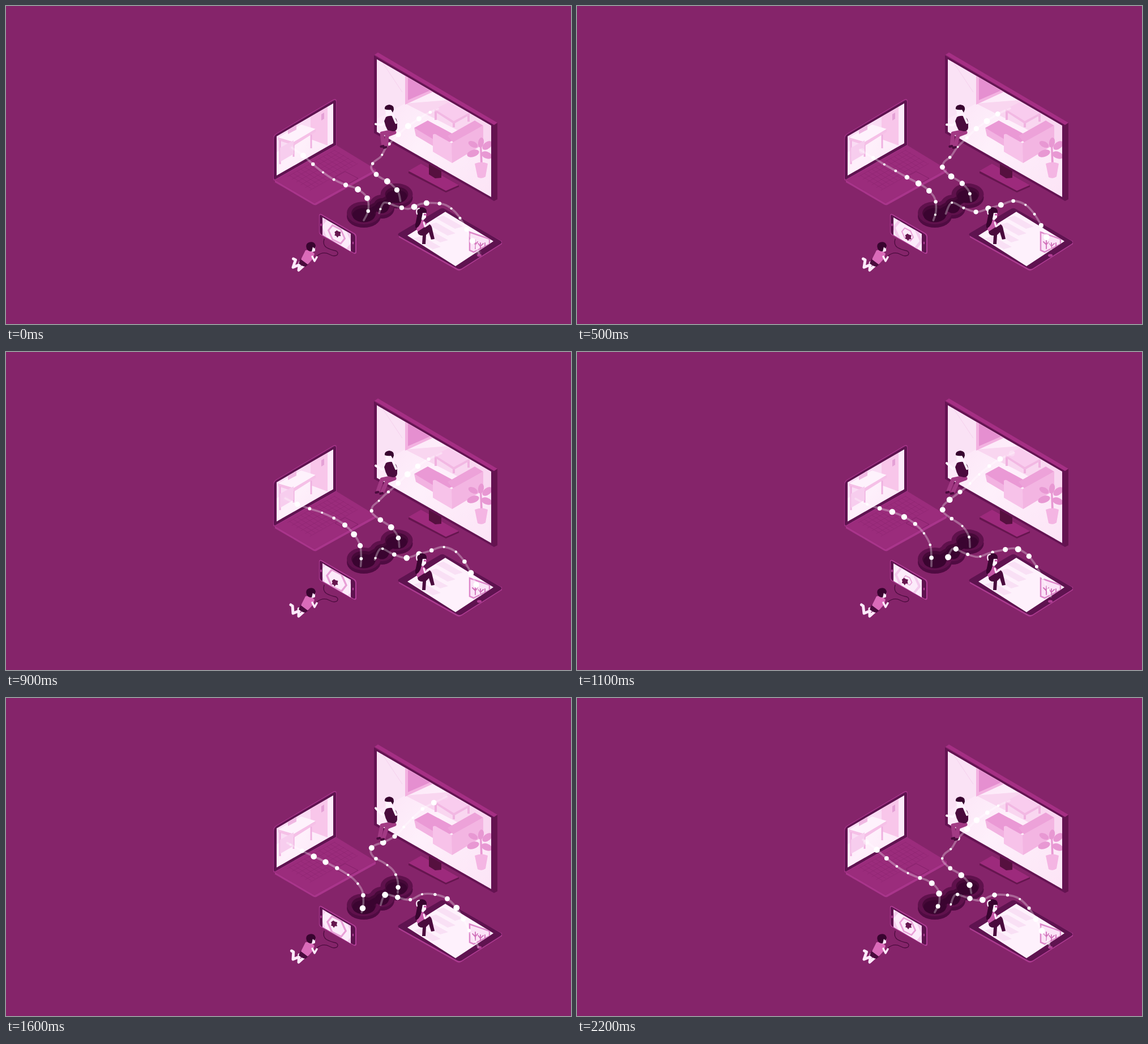
These frames come from a looping animation (998x561 px, 2.25 s). An HTML page:

```html
<!DOCTYPE html>
<html lang="en">
<head>
<meta charset="utf-8">
<title>Connected screens</title>
<style>
html, body { margin: 0; width: 100%; height: 100%; overflow: hidden; background: #85246a; }
svg { display: block; width: 100vw; height: 100vh; }
.round { stroke-linejoin: round; stroke-linecap: round; }
.line { fill: none; stroke-linecap: round; stroke-linejoin: round; }
</style>
</head>
<body>
<svg viewBox="0 0 998 561" preserveAspectRatio="none">
  <defs>
    <clipPath id="tvClip"><path d="M655 94L857 211V337L655 222Z"/></clipPath>
    <clipPath id="laptopClip"><path d="M478 230L578 172V242L478 299Z"/></clipPath>
    <clipPath id="tabletClip"><path d="M776 363L861 415L794 459L709 405Z"/></clipPath>
    <clipPath id="phoneClip"><path d="M559 373L609 402V433L559 404Z"/></clipPath>
    <linearGradient id="pale" x1="0" y1="0" x2="1" y2="1">
      <stop offset="0" stop-color="#fbe0f5"/><stop offset=".5" stop-color="#fef0fb"/><stop offset="1" stop-color="#fce4f6"/>
    </linearGradient>
  </defs>
  <rect width="998" height="561" fill="#85246a"/>

  <g id="tv">
    <path d="M711 292L733 278L800 316V319L777 329L711 295Z" fill="#66154f"/>
    <path d="M711 291L733 278L800 316L777 326Z" fill="#9d2a7c"/>
    <path d="M747 273L769 286V303L758 304L747 297Z" fill="#56103f"/>
    <path d="M651 86L657 82L868 206L862 210Z" fill="#a52f84" class="round"/>
    <path d="M862 210L868 206V341L862 344Z" fill="#65134f"/>
    <path d="M650 87L862 210V344L650 224Z" fill="#641352"/>
    <path d="M655 94L857 211V337L655 222Z" fill="url(#pale)"/>
    <g clip-path="url(#tvClip)">
      <path d="M655 94L705 123V172L655 199Z" fill="#fae2f5"/>
      <path d="M664 98L700 152M705 172L757 143" stroke="#f6d3ee" stroke-width="1.2"/>
      <path d="M705 172L780 166L857 211V250L770 205Z" fill="#f9d6f0"/>
      <path d="M705 122L755 151L705 174Z" fill="#f3b2e1"/>
      <path d="M710 126L749 149L710 166Z" fill="#e58fd0"/>
      <path d="M757 185V201H761V188L789 205V214H793V206L815 194V204H819V190Z" fill="#f0b2e0"/>
      <path d="M757 182L781 170L819 190L791 206Z" fill="#f9ccee"/>
      <path d="M757 182L791 203L819 188V192L791 208L757 186Z" fill="#f2b8e3"/>
      <path d="M721 215L745 202L801 232L768 247Z" fill="#ea99d5"/>
      <path d="M721 215L768 243V255L724 229Z" fill="#f2b2e1"/>
      <path d="M780 229L828 202L843 211L791 242Z" fill="#eda2d9"/>
      <path d="M754 227Q757 224 762 228L787 242L843 211V244L788 277L754 257Z" fill="#f7c2e9"/>
      <path d="M787 242L843 211V244L788 277Z" fill="#f3b5e2"/>
      <g fill="#e898d3">
        <ellipse cx="825" cy="244" rx="9" ry="5" transform="rotate(28 825 244)"/>
        <ellipse cx="839" cy="241" rx="5" ry="9" transform="rotate(10 839 241)"/>
        <ellipse cx="850" cy="246" rx="10" ry="6" transform="rotate(-38 850 246)"/>
        <ellipse cx="825" cy="260" rx="11" ry="6" transform="rotate(-18 825 260)"/>
        <ellipse cx="849" cy="263" rx="10" ry="6" transform="rotate(22 849 263)"/>
        <path d="M837 244H840L842 280H838Z"/>
      </g>
      <path d="M828 278Q840 273 851 278L847 301Q840 306 833 302Z" fill="#f4b5e3"/>
    </g>
  </g>

  <g id="laptop">
    <path d="M475 307L545 348L653 288V293L548 351Q545 352 542 350L475 311Z" fill="#a9358b"/>
    <path d="M475 307L584 246L653 288L545 348Z" fill="#9b2c7c"/>
    <path id="keys" stroke="#8f2672" stroke-width=".7" class="line"/>
    <path d="M581 302L599 292L622 304L604 314Z" fill="none" stroke="#84216a"/>
    <path d="M472 234Q472 228 477 225L578 165Q584 162 584 169V246L474 308Q472 308 472 303Z" fill="#a33286"/>
    <path d="M473 235Q473 229 478 226L578 167Q583 164 583 170V245L475 306Q473 306 473 302Z" fill="#5f1350"/>
    <path d="M478 230L578 172V242L478 299Z" fill="url(#pale)"/>
    <g clip-path="url(#laptopClip)">
      <path d="M538 190L568 172V246L538 235Z" fill="#f8c6ea"/>
      <path d="M568 172L578 166V246L568 243Z" fill="#fdeafa"/>
      <path d="M478 230L538 195V222L478 258Z" fill="#fadcf4"/>
      <path d="M557 191L562 188V199L557 202Z" fill="#e4a1d6"/>
      <path d="M481 232L521 209L547 217L508 240Z" fill="#fef2fc"/>
      <path d="M481 232L508 240L547 217V222L509 246L481 237Z" fill="#f5c0e7"/>
      <path d="M484 237V279M508 245V266M539 227V251" stroke="#efb0e0" stroke-width="3"/>
      <path d="M484 250L508 237V261L484 275Z" fill="#f7cdee"/>
      <path d="M498 226V216L513 208V218Z" fill="#f0b9e3"/>
    </g>
  </g>

  <g id="hole"></g>

  <g id="tablet">
    <path d="M694 405L773 360L876 415V420L805 465Q801 468 797 466L694 408Z" fill="#ac3b90" class="round"/>
    <path d="M695 400L765 359Q770 355 775 358L873 414Q878 417 873 420L805 463Q801 465 797 463L695 406Q690 403 695 400Z" fill="#5f1350"/>
    <path d="M776 363L861 415L794 459L709 405Z" fill="#fef1fc"/>
    <g clip-path="url(#tabletClip)">
      <path id="stairs" fill="#f9e0f5"/>
      <path d="M819 399L854 411V420L826 434L819 431Z" fill="#fbe3f7" stroke="#dd88ca" stroke-width="2.5"/>
      <path d="M829 428V413M829 421L824 416M829 421L833 416M838 428V418M838 424L834 419M838 424L843 419M846 425V418" stroke="#d06fb9" stroke-width="1.8" class="line"/>
    </g>
    <ellipse cx="836" cy="440" rx="4" ry="2.4" fill="#b03e94"/>
  </g>

  <g id="strings"></g>

  <g id="phone">
    <path d="M553 370Q553 366 557 367L616 401Q619 403 619 406V435Q618 438 615 437L556 404Q553 402 553 399Z" fill="#b13d96"/>
    <path d="M554 371Q554 367 557 369L614 402Q617 404 617 407V433Q617 436 614 435L557 403Q554 401 554 398Z" fill="#5f1350"/>
    <path d="M559 373L609 402V433L559 404Z" fill="#fcebfa"/>
    <g clip-path="url(#phoneClip)">
      <path id="ringBig" fill="none" stroke="#f4cbed"/>
      <path id="ring" fill="none" stroke="#e8a0d7"/>
      <path id="flower" d="M-5 -3L-1 -6L2 -4L6 -3L5 1L6 4L2 4L0 7L-2 4L-5 3L-4 0Z" fill="#66164f"/>
    </g>
    <ellipse cx="556.5" cy="386" rx="1.5" ry="2.5" fill="#b13d96"/>
    <ellipse cx="613" cy="418" rx="1.2" ry="2.5" fill="#b13d96"/>
  </g>

  <g id="boy">
    <path d="M562 411Q559 421 566 426Q573 430 583 432Q588 435 585 439Q580 443 571 438Q560 432 549 441" stroke="#4a0b3d" stroke-width="1.3" class="line"/>
    <path id="boyLegs" stroke="#fdeafa" stroke-width="5" class="line"/>
    <path d="M521 445L535 455L529 460Q522 459 517 454Z" fill="#4a0b3d"/>
    <path d="M529 431Q537 429 545 437L542 446L533 456L521 447Z" fill="#da6bb9"/>
    <path d="M541 442L545 450L549 443" stroke="#fdeafa" stroke-width="3.5" class="line"/>
    <path d="M537 425H546V432Q543 435 538 433Z" fill="#fdeafa"/>
    <path d="M531 428Q528 420 535 417Q545 414 547 423L545 428L542 425L540 433Q533 433 531 428Z" fill="#38042f"/>
  </g>

  <g id="man">
    <path id="manLegs" stroke="#a23a84" stroke-width="7" class="line"/>
    <path id="manShoes" stroke="#4a0b3d" stroke-width="4" class="line"/>
    <path id="manArm" stroke="#fff4fe" stroke-width="4" class="line"/>
    <path d="M671 196Q675 193 682 194Q691 197 691 207V215Q690 221 683 221L674 219Q670 212 668 203Z" fill="#4a0b3d"/>
    <path d="M670 181L683 182L682 191Q677 196 671 193Z" fill="#fff4fe"/>
    <path d="M689 206L683 192" stroke="#fff4fe" stroke-width="4" class="line"/>
    <path d="M669 182Q668 175 677 174Q686 175 685 183L683 188L680 183Q674 184 669 182Z" fill="#38042f"/>
  </g>

  <g id="girl">
    <path d="M727 399Q729 390 740 388L748 385Q752 387 753 394L757 411L751 412L747 399L742 404L741 420L735 420L736 405Q728 405 727 399Z" fill="#4a0b3d"/>
    <path d="M726 381L736 377L743 384L741 389L727 398Q724 393 726 381Z" fill="#c457a6"/>
    <path d="M738 382L740 389L746 385" stroke="#fdeafa" stroke-width="3" class="line"/>
    <path d="M732 364L742 363V373L737 378L732 376Z" fill="#fff4fe"/>
    <path d="M727 366Q725 355 735 355Q744 356 743 365L736 365L734 375Q733 387 725 392Q721 390 724 381Z" fill="#38042f"/>
    <path d="M726 367Q723 358 730 357" stroke="#fff4fe" stroke-width="2" class="line"/>
    <path d="M738 368H743" stroke="#c457a6" stroke-width="3"/>
  </g>
</svg>
<script>
const LOOP = 2250, STEP = 50, TAU = Math.PI * 2;
const byId = id => document.getElementById(id);
const make = (parent, name, attrs) => {
  const node = document.createElementNS('http://www.w3.org/2000/svg', name);
  for (const key in attrs) node.setAttribute(key, attrs[key]);
  return parent.appendChild(node);
};
const setD = (id, d) => byId(id).setAttribute('d', d);
const wave = (t, peak) => Math.cos(TAU * (t - peak) / LOOP);
const points = text => text.split(' ').map(p => p.split(',').map(Number));

// Even sway, and a sway that rises slowly and drops fast
const sway = peak => t => (1 + wave(t, peak)) / 2;
const lopsided = (start, rise) => t => {
  const u = (t - start + LOOP) % LOOP;
  return Math.pow(u < rise ? u / rise : (LOOP - u) / (LOOP - rise), 1.3);
};

// Smooth curve through all knots
function curve(p) {
  let d = 'M' + p[0];
  for (let i = 0; i < p.length - 1; i++) {
    const a = p[i - 1] || p[i], b = p[i], c = p[i + 1], e = p[i + 2] || c;
    const c1 = b.map((v, j) => v + (c[j] - a[j]) / 6);
    const c2 = c.map((v, j) => v - (e[j] - b[j]) / 6);
    d += `C${c1} ${c2} ${c}`;
  }
  return d;
}

// Joined rings: side, rim, inner wall, floor
const lobes = [[632, 365, 30, 20], [664, 351, 22, 18], [690, 332, 28.5, 19]];
for (const [dy, inset, fill] of [[6, 0, '#500b42'], [0, 0, '#5f114c'], [0, 8, '#460938'], [4, 10, '#3a0430']]) {
  const hole = byId('hole');
  for (const [cx, cy, rx, ry] of lobes)
    make(hole, 'ellipse', { cx, cy: cy + dy, rx: rx - inset, ry: ry - inset * .75, fill });
  make(hole, 'path', { d: `M636 ${363 + dy}L688 ${334 + dy}`, stroke: fill, 'stroke-width': 26 - inset * 1.5 });
}

let keys = '';
for (let i = 0; i < 6; i++) keys += `M${497 + i * 8} ${301 + i * 4.8}l84 -47`;
for (let i = 0; i < 13; i++) keys += `M${501 + i * 6.6} ${299 - i * 3.7}l38 23`;
setD('keys', keys);

let stairs = '';
for (let i = 0; i < 5; i++) stairs += `M${773 - i * 13} ${370 + i * 12}l34 19l-14 4l-34 -19Z`;
setD('stairs', stairs);

// first: offset of the leading bead, crest: position of the largest bead, both in bead gaps
const GAP = 23;
const strings = [
  { mix: sway(0), first: .785, crest: 2.55,
    from: '626,378 626,362 624,341 613,320 597,303 578,291 557,282 535,276 513,269 492,259',
    to: '632,378 640,360 637,337 619,322 598,315 577,305 558,292 540,277 524,263 505,250' },
  { mix: lopsided(100, 1500), first: .9, crest: 1.85,
    from: '697,344 692,327 676,312 657,301 645,287 650,276 663,266 672,249 689,230 705,215 723,203 742,191 762,182',
    to: '692,344 692,323 684,304 668,291 650,281 644,269 651,260 668,254 688,243 706,224 722,208 740,193 778,174' },
  { mix: sway(700), first: .33, crest: 3.6,
    from: '663,365 671,347 692,351 714,355 736,345 758,346 780,355 795,371 807,391 818,413 829,432 834,440',
    to: '650.5,366.5 661,347 683,357 705,364 727,358 749,351 770,343 792,349 808,365 820,385 830,407 838,428' }
].map(s => {
  const group = make(byId('strings'), 'g', {});
  return { ...s, from: points(s.from), to: points(s.to),
    path: make(group, 'path', { class: 'line', stroke: '#fff', 'stroke-width': 3.6, 'stroke-opacity': .3 }),
    beads: Array.from({ length: 15 }, () => make(group, 'circle', { fill: '#fff' })) };
});

function drawString(s, t) {
  const mix = s.mix(t);
  s.path.setAttribute('d', curve(s.from.map((p, i) => p.map((v, j) => v + (s.to[i][j] - v) * mix))));
  const total = s.path.getTotalLength();
  const offset = (s.first + 12 * t / LOOP) % 1;
  const crest = s.crest + 30 * t / LOOP;
  s.beads.forEach((bead, i) => {
    const place = offset + i, along = place * GAP;
    const { x, y } = s.path.getPointAtLength(Math.min(along, total));
    bead.setAttribute('cx', x);
    bead.setAttribute('cy', y);
    bead.setAttribute('r', 3.7 + 1.75 * Math.cos(TAU * (place - crest) / 6));
    bead.setAttribute('opacity', Math.max(0, Math.min(1, (total - along) / 15)));
  });
}

function drawRing(id, r) {
  let d = '';
  for (let i = 0; i < 6; i++) {
    const a = i * TAU / 6, x = r * Math.cos(a);
    d += `${i ? 'L' : 'M'}${584 + x} ${403 + x * .5 + r * Math.sin(a)}`;
  }
  setD(id, d + 'Z');
  byId(id).setAttribute('stroke-width', r * .2);
}

function draw(t) {
  strings.forEach(s => drawString(s, t));
  const kick = wave(t, 0), hand = 202 + 9 * wave(t, 280);

  setD('boyLegs', `M524 454L507 461L${508.5 + 3 * kick} 448L${505 + 2.5 * kick} 446M527 457L517 466L${518 + kick} 453`);
  const foot = 661.5 + 5 * kick, other = 668 + 3.5 * kick;
  setD('manLegs', `M684 221L664 225L${foot} 244M686 223L673 228L${other} 246`);
  setD('manShoes', `M${foot} 247l-4 1M${other} 249l-4 1`);
  setD('manArm', `M671 203L664 ${208 + (hand - 202) * .3}L653 ${hand}`);

  const zoom = (t / 750 + .65) % 1;
  drawRing('ring', 6 + 13 * zoom);
  drawRing('ringBig', 19 + 16 * zoom);
  byId('flower').setAttribute('transform', `translate(${582 + 4 * wave(t, 200)} ${403 + 5 * wave(t, 650)})`);
}

function tick() {
  const t = performance.now() % LOOP;
  draw(Math.floor(t / STEP) * STEP);
  requestAnimationFrame(tick);
}
tick();
</script>
</body>
</html>
```
